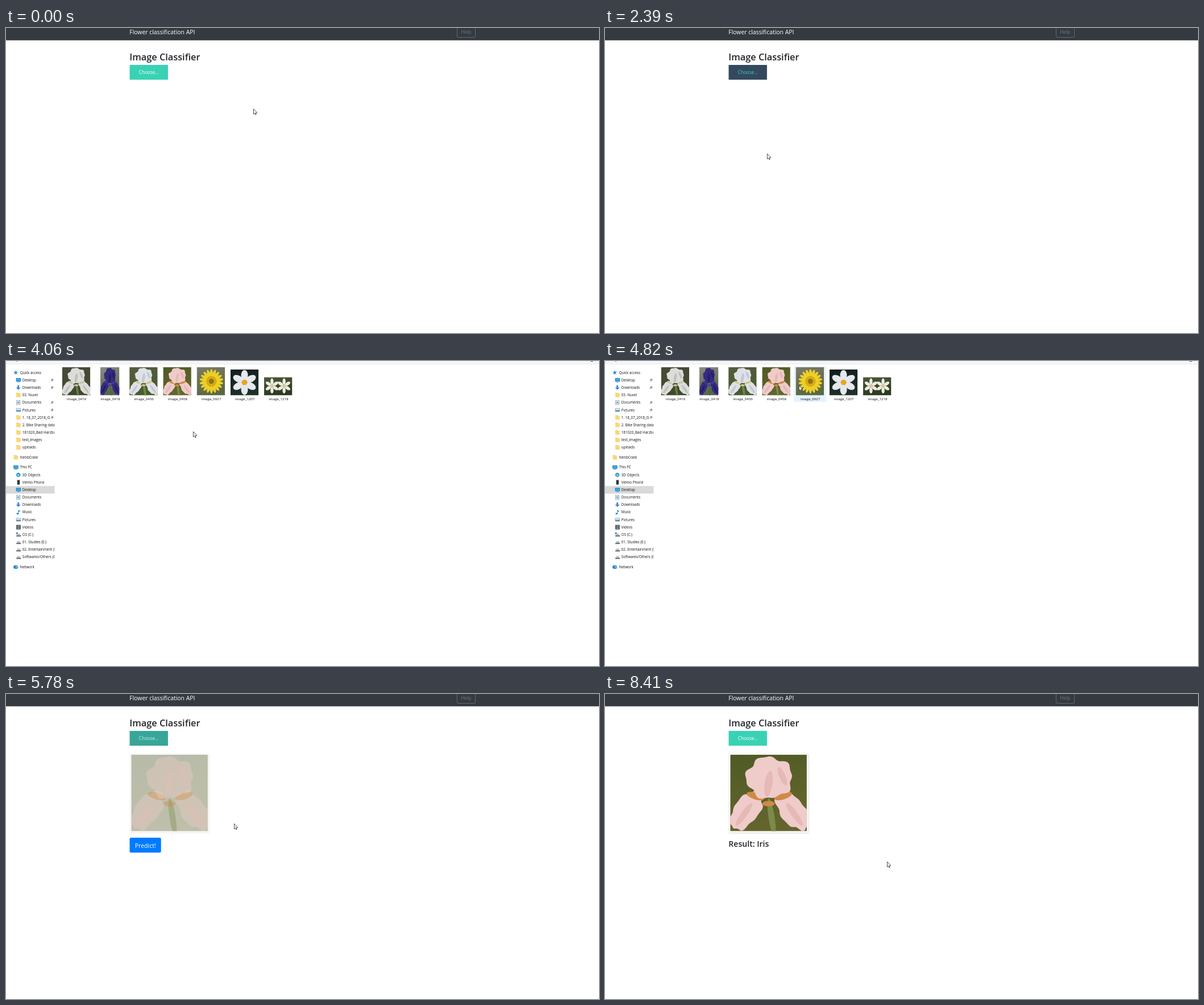
Recreate the animation shown at these times as an HTML page with a canvas. Size 1043x537 px, loop 8490 ms.

```html
<!DOCTYPE html>
<html lang="en">
<head>
<meta charset="utf-8">
<title>Flower classification API</title>
<style>
html, body { margin: 0; width: 100%; height: 100%; overflow: hidden; background: #fff; }
canvas { display: block; width: 100%; height: 100%; }
</style>
</head>
<body>
<canvas id="stage" width="1043" height="537"></canvas>
<script>
const W = 1043, H = 537, LOOP = 8490, PAD = 12, TAU = Math.PI * 2;
const stage = document.getElementById('stage').getContext('2d');
const layer = document.createElement('canvas');
layer.width = W;
layer.height = H + PAD * 2;
const dialog = layer.getContext('2d');
let g = stage;

const T = { hover: 510, open: 2550, files: 2800, select: 4990, close: 5275, closed: 5535,
            preview: 5510, leave: 5620, predict: 6990, result: 7800 };
const clicks = [[1870, 2030], [4980, 5440], [6630, 6760]];

// Pointer moves: begin, end, destination
const home = { x: 435, y: 142 };
const moves = [
  [70, 700, 250, 75], [1950, 2390, 285, 221], [3160, 3710, 185, 42], [3900, 4060, 329, 124],
  [4060, 4400, 476, 46], [4400, 4740, 362, 44], [4740, 4940, 302, 40], [5480, 5780, 401, 228],
  [5780, 6050, 479, 234], [6050, 6600, 263, 266], [6990, 7700, 496, 295]
];

const clamp = v => Math.max(0, Math.min(1, v));
const span = (t, from, to) => clamp((t - from) / (to - from));
const easeOut = p => 1 - Math.pow(1 - p, 2.2);
const swing = p => 0.5 - Math.cos(Math.PI * p) / 2;
const inside = (p, x, y, w, h) => p.x >= x && p.x < x + w && p.y >= y && p.y < y + h;
const mix = (a, b, k) => `rgb(${a.map((v, i) => Math.round(v + (b[i] - v) * k))})`;

const pointer = t => moves.reduce((p, [from, to, x, y]) => {
  const k = swing(span(t, from, to));
  return { x: p.x + (x - p.x) * k, y: p.y + (y - p.y) * k };
}, home);

function box(x, y, w, h, fill) {
  g.fillStyle = fill;
  g.fillRect(x, y, w, h);
}

function rounded(x, y, w, h, r) {
  g.beginPath();
  g.roundRect(x, y, w, h, r);
}

function oval(x, y, rx, ry, fill, turn = 0) {
  g.fillStyle = fill;
  g.beginPath();
  g.ellipse(x, y, rx, ry, turn, 0, TAU);
  g.fill();
}

function poly(pts, fill, stroke) {
  g.beginPath();
  pts.forEach(p => g.lineTo(p[0], p[1]));
  g.closePath();
  g.fillStyle = fill;
  g.fill();
  if (stroke) { g.strokeStyle = stroke; g.stroke(); }
}

const ring = (n, point) => [...Array(n)].map((_, i) => point(i / n * TAU, i));

function text(str, x, y, size, color, weight = 400, align = 'left') {
  g.font = `${weight} ${size}px "Open Sans", "Noto Sans", sans-serif`;
  g.textAlign = align;
  g.fillStyle = color;
  g.fillText(str, x, y);
}

// Runs paint moved to x, y, and clipped to w by h when given
function at(x, y, paint, w, h) {
  g.save();
  g.translate(x, y);
  if (w) {
    g.beginPath();
    g.rect(0, 0, w, h);
    g.clip();
  }
  paint();
  g.restore();
}

// Flowers fill a unit square
const picture = (x, y, w, h, paint) => at(x, y, () => { g.scale(w, h); paint(); }, w, h);

function backdrop(top, bottom) {
  const fade = g.createLinearGradient(0, 0, 0.3, 1);
  fade.addColorStop(0, top);
  fade.addColorStop(1, bottom);
  box(0, 0, 1, 1, fade);
}

function ruffle(x, y, rx, ry, turn, fill) {
  const c = Math.cos(turn), s = Math.sin(turn);
  poly(ring(60, a => {
    const r = 1 + .06 * Math.sin(a * 5 + x * 9) + .05 * Math.sin(a * 9 + y * 7);
    const u = Math.cos(a) * rx * r, v = Math.sin(a) * ry * r;
    return [x + u * c - v * s, y + u * s + v * c];
  }), fill);
}

const iris = (top, bottom, petal, shade, throat, stem) => () => {
  backdrop(top, bottom);
  oval(.54, .82, .04, .25, stem, -.15);
  for (const side of [-1, 1]) {
    const x = d => .51 + side * d;
    ruffle(x(.3), .73, .29, .16, side * .93, petal);
    oval(x(.33), .78, .18, .04, shade, side * .95);
    oval(x(.18), .54, .12, .045, throat, side * -.3);
  }
  oval(.5, .64, .08, .035, throat);
  ruffle(.51, .3, .3, .27, 0, petal);
  oval(.5, .38, .05, .17, shade, .15);
  oval(.68, .28, .04, .13, shade, -.4);
};

function bloom(x, y, rx, ry, n, wide, petal, core, coreSize) {
  at(x, y, () => {
    g.scale(rx, ry);
    for (let i = 0; i < n; i++) {
      g.rotate(TAU / n);
      oval(0, -.58, wide, .43, petal);
    }
    oval(0, 0, coreSize, coreSize, core);
  });
}

const pinkIris = iris('#4f5a24', '#64652e', '#efcbc9', '#e5b9b6', '#cf8a45', '#7c8a4a');
const files = [
  { id: '0416', paint: iris('#4a4a3a', '#3f4a2c', '#dcdcd8', '#c0c0bc', '#c9c4a4', '#6b7c42') },
  { id: '0418', w: 33.5, paint: iris('#8d8a84', '#56664a', '#342a80', '#241b62', '#46389a', '#4d6a3a') },
  { id: '0456', paint: iris('#565c40', '#4a5a30', '#dfe1e6', '#c2c8d4', '#d0c684', '#6b8a42') },
  { id: '0458', paint: pinkIris },
  { id: '0927', paint() {
    backdrop('#7c7a68', '#5c6840');
    bloom(.52, .5, .42, .43, 18, .13, '#ecd028', '#d9aa14', .45);
    oval(.52, .5, .09, .09, '#8a7418');
  } },
  { id: '1207', h: 45.5, paint() {
    backdrop('#141c1c', '#1e3028');
    bloom(.5, .5, .45, .48, 6, .27, '#e6e8f0', '#e8a818', .22);
  } },
  { id: '1218', h: 32, paint() {
    backdrop('#4c5a38', '#2c3a20');
    for (const x of [.28, .71]) bloom(x, .48, .25, .41, 6, .22, '#eeece2', '#e0d48c', .18);
  } }
];

const BLUE = '#2d8fd8', GREY = '#8a929a';
const icons = {
  star: () => poly(ring(10, (a, i) => {
    const r = i % 2 ? 1.8 : 4.2;
    return [4 + Math.sin(a) * r, -Math.cos(a) * r];
  }), BLUE),
  screen() { box(0, -3.5, 8.5, 6, '#1783c8'); box(1, -2.7, 6.5, 4.4, '#36a8e8'); box(2, 3, 4.5, .8, '#567'); },
  down() { box(2.5, -4, 3, 4, '#3b87cf'); poly([[0, 0], [8, 0], [4, 4]], '#3b87cf'); },
  folder() { box(.5, -4, 4, 2, '#e8c35a'); box(.5, -3.2, 7.5, 7, '#f8d775'); },
  page() { box(.5, -4, 7, 8, GREY); box(1.2, -3.3, 5.6, 6.6, '#f2f7fb'); box(2, -2, 4, 4, '#8db8d8'); },
  image() { box(0, -3, 8.5, 6, GREY); box(.7, -2.3, 7.1, 4.6, '#d8edf8'); box(.7, .3, 7.1, 2, '#3f86ad'); },
  cube() { poly(ring(6, a => [4 + Math.sin(a) * 4, -Math.cos(a) * 4]), '#1f90c4'); box(2, -1, 4, 3, '#8ed4f0'); },
  phone() { box(2, -4, 4.5, 8, '#333'); },
  note() { oval(2.7, 2.6, 2, 1.5, BLUE); box(3.8, -4, 1, 6.5, BLUE); box(4, -3, 3, 2, BLUE); },
  film() { box(.5, -4, 7.5, 8, '#444'); box(2, -3, 4.5, 2.6, GREY); box(2, .4, 4.5, 2.6, GREY); },
  drive() { box(2, -2, 5, 3, '#c0c4c8'); box(.5, 1, 8, 2.3, '#6a7078'); },
  system() { icons.drive(); box(0, -4, 3, 3, BLUE); },
  net() { oval(4, 0, 4.2, 3.2, '#2f88c8'); box(4, -2, 4, 3, '#72c0ea'); }
};

// Each group is a heading and its children; * is pinned, > is the current place
const groups = [
  ['star:Quick access', 'screen:Desktop:*', 'down:Downloads:*', 'folder:03. Nuvel', 'page:Documents:*',
   'image:Pictures:*', 'folder:1. 18_07_2018_Ge:*', 'folder:2. Bike Sharing data',
   'folder:181020_Bad Harzburg', 'folder:test_images', 'folder:uploads'],
  ['folder:NimbCrate'],
  ['screen:This PC', 'cube:3D Objects', 'phone:Velmo Phone', 'screen:Desktop:>', 'page:Documents',
   'down:Downloads', 'note:Music', 'image:Pictures', 'film:Videos', 'system:OS (C|)',
   'drive:01. Studies (E|)', 'drive:02. Entertainment (F|)', 'drive:Softwares/Others (G|)'],
  ['net:Network']
];

function pin() {
  g.rotate(.75);
  box(-1.5, -2.5, 3, 3, '#909498');
  box(-2.2, .3, 4.4, .8, '#909498');
  box(-.3, 1, .7, 2.5, '#909498');
}

function place(entry, y, indent) {
  const [icon, label, flag] = entry.split(':');
  if (flag === '>') box(0, y - 6.5, 85.5, 13.2, '#d9d9d9');
  at(indent ? 17.7 : 13.2, y, icons[icon]);
  at(0, y - 7, () => text(label.replace('|', ':'), indent ? 28.8 : 24.8, 9.2, 6.25, '#111'),
    flag === '*' ? 77 : 85.5, 14);
  if (flag === '*') at(81, y, pin);
}

function sidebar() {
  const row = 13.17, gap = 4.35;
  let y = 20.5;
  for (const group of groups) {
    group.forEach((entry, i) => {
      place(entry, y, i > 0);
      y += row;
    });
    y += gap;
  }
}

function toolbar() {
  const caret = x => poly([[x, -4], [x + 4, -4], [x + 2, -2]], '#333');
  box(0, -PAD, W, PAD + 5, '#f5f6f7');
  box(0, 5, W, .8, '#e4e6e8');
  text('Organize', 9.8, -1.3, 6.25, '#1e3555');
  caret(39);
  text('New folder', 59.5, -1.3, 6.25, '#1e3555');
  box(977, -6, 7, 5, '#7a8a9a');
  caret(990);
  box(1007, -6.5, 8, 6.5, '#4a6a90');
  box(1008, -5, 4, 4, '#fff');
  oval(1030.3, -3.4, 4.6, 4.6, '#1f5fb8');
  text('?', 1030.3, -1.2, 6, '#fff', 600, 'center');
}

function tile({ id, paint, w = 49.5, h = 49.5 }, i, t, p) {
  const left = 95.5 + 59.2 * i, chosen = i === 3 && t >= T.select;
  if (chosen || inside(p, left, 9, 57, 63)) box(left, 9, 57, 63, chosen ? '#cce8ff' : '#e5f3ff');
  if (chosen) {
    g.strokeStyle = '#99d1ff';
    g.lineWidth = .8;
    g.strokeRect(left + .4, 9.4, 56.2, 62.2);
  }
  picture(left + 28 - w / 2, 60.5 - h, w, h, paint);
  text('image_' + id, left + 28.7, 68.9, 6.15, '#111', 400, 'center');
}

function drawDialog(t, p) {
  const opening = easeOut(span(t, 2500, 2790)), closing = span(t, T.close, T.closed);
  const scale = 1 - .036 * (1 - opening) - .038 * closing;
  g = dialog;
  g.setTransform(1, 0, 0, 1, 0, PAD);
  box(0, -PAD, W, H + PAD * 2, '#fff');
  toolbar();
  sidebar();
  if (t >= T.files) files.forEach((file, i) => tile(file, i, t, p));
  if (scale < 1) for (const x of [0, W - 1]) box(x, -PAD, 1, H + PAD * 2, '#777');
  g = stage;
  g.globalAlpha = opening * (1 - closing);
  at(W / 2, 302, () => {
    g.scale(scale, scale);
    g.drawImage(layer, -W / 2, -302 - PAD);
  });
  g.globalAlpha = 1;
}

function spinner(t) {
  const turn = (t - T.predict) / 1000 * TAU;
  const arc = (from, to, color) => {
    g.strokeStyle = color;
    g.beginPath();
    g.arc(229.4, 265.8, 10, from, to);
    g.stroke();
  };
  g.lineWidth = 3.9;
  arc(0, TAU, '#f3f3f3');
  arc(turn - TAU * 3 / 8, turn - TAU / 8, '#3498db');
}

function header() {
  box(0, 0, W, 21.7, '#343a40');
  text('Flower classification API', 217.3, 10.8, 10.4, '#fff');
  g.strokeStyle = '#6c757d';
  g.lineWidth = .8;
  rounded(793.5, -9.5, 32, 26, 2);
  g.stroke();
  text('Help', 809.5, 10, 8.4, '#6c757d', 400, 'center');
  text('Image Classifier', 217.3, 57, 16.3, '#212529', 600);
}

function chooseButton(t) {
  const dark = easeOut(span(t, T.hover, T.hover + 400)) - easeOut(span(t, T.leave, T.leave + 400));
  const teal = [57, 210, 180];
  box(217.5, 65, 67.4, 26, mix(teal, [52, 73, 94], dark));
  text('Choose...', 251.2, 81, 8.1, mix([255, 255, 255], teal, dark), 400, 'center');
}

function preview(t) {
  g.save();
  g.globalAlpha = swing(span(t, T.preview, T.preview + 650));
  g.shadowColor = 'rgba(0,0,0,.16)';
  g.shadowBlur = 2.5;
  g.shadowOffsetY = 1;
  box(217.5, 104.3, 140, 139.8, '#f8f8f8');
  g.shadowColor = 'transparent';
  picture(220.3, 107, 134.6, 134.5, pinkIris);
  g.restore();
}

function predictButton(p) {
  g.fillStyle = inside(p, 217.5, 253, 55, 26) ? '#0069d9' : '#007bff';
  rounded(217.5, 253, 55.2, 26.2, 2.5);
  g.fill();
  text('Predict!', 245.2, 270.6, 10.5, '#fff', 400, 'center');
}

function result(t) {
  g.globalAlpha = swing(span(t, T.result, T.result + 600));
  text('Result: Iris', 217.3, 268.5, 14.1, '#212529', 600);
  g.globalAlpha = 1;
}

function drawPage(t, p) {
  box(0, 0, W, H, '#fff');
  header();
  chooseButton(t);
  if (t < T.preview) return;
  preview(t);
  if (t < T.predict) predictButton(p);
  else if (t < T.result) spinner(t);
  else result(t);
}

const arrow = [[0, 0], [0, 9.3], [2.1, 7.4], [3.4, 10.4], [4.8, 9.8], [3.6, 6.9], [6.3, 6.7]];
const hand = [[-.8, 0], [.8, 0], [1.1, 4], [4.2, 5], [3.6, 11], [-1, 11], [-3.6, 6.6], [-1.1, 7]];

function drawPointer(t, p, pageOn) {
  if (clicks.some(c => t >= c[0] && t < c[1])) oval(p.x + .5, p.y, 6.3, 6.3, 'rgba(215,220,0,.62)');
  const over = pageOn && (inside(p, 217.5, 65, 67, 26) ||
    t >= T.preview && t < T.predict && inside(p, 217.5, 253, 55, 26));
  g.lineWidth = .8;
  at(p.x + .4, p.y + .4, () => poly(over ? hand : arrow, '#fff', '#222'));
}

function frame(now) {
  const t = now % LOOP, p = pointer(t);
  const open = t >= T.open && t < T.closed;
  drawPage(t, p);
  if (open) drawDialog(t, p);
  drawPointer(t, p, !open);
}

const start = performance.now();
(function tick() {
  frame(performance.now() - start);
  requestAnimationFrame(tick);
})();
</script>
</body>
</html>
```
